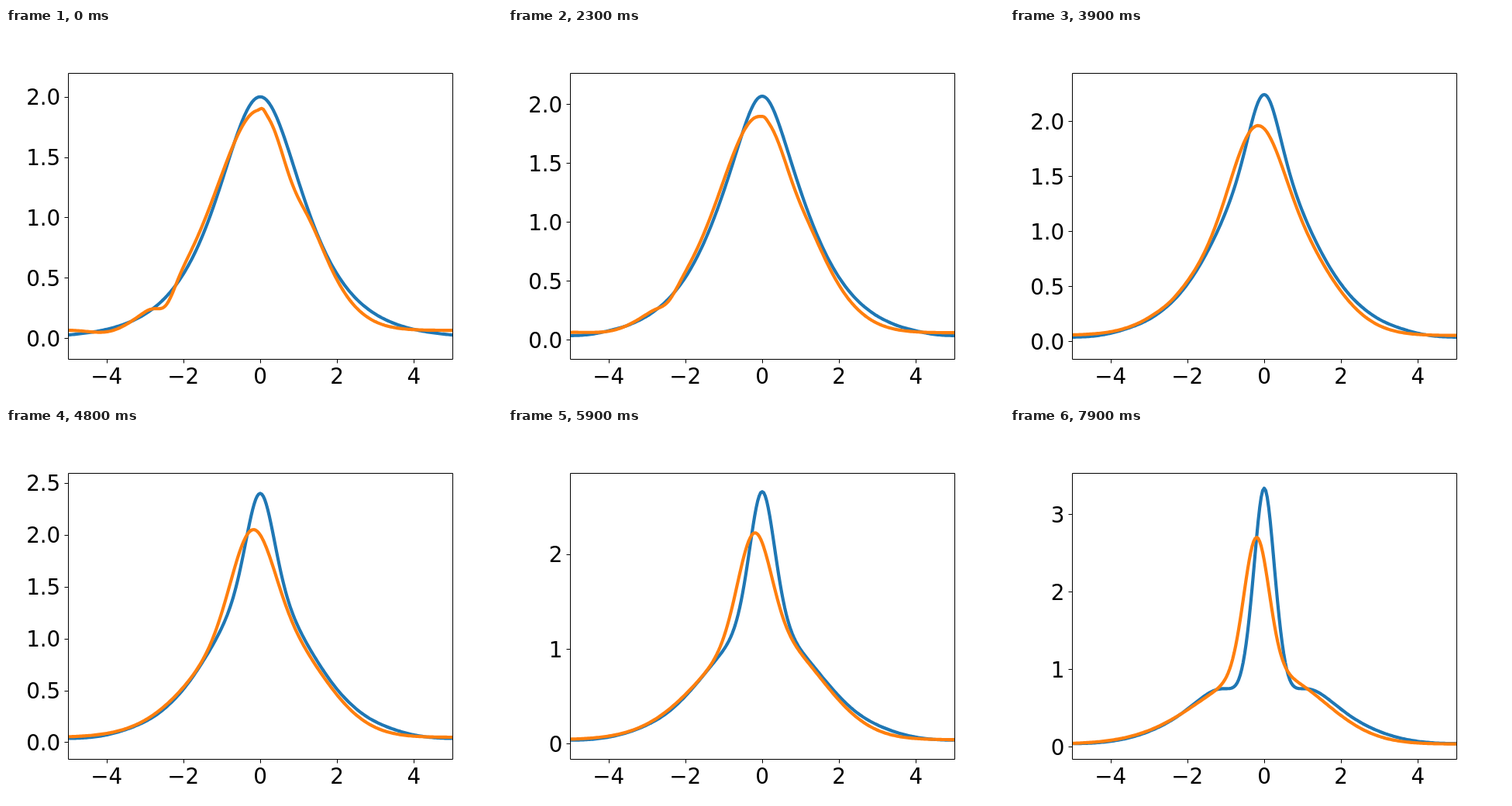
Animation, 640 px wide and 480 px high, one loop 8000 ms. Source, as an HTML page:

```html
<!DOCTYPE html>
<html lang="en">
<head>
<meta charset="utf-8">
<title>Second-order soliton: solution and approximation</title>
<style>
  html, body { margin: 0; width: 100%; height: 100%; overflow: hidden; background: #fff; }
  svg { display: block; width: 100vw; height: 100vh; }
  text { font: 27.78px "DejaVu Sans", sans-serif; fill: #000; }
  .curve { fill: none; stroke-width: 4.17; stroke-linejoin: round; stroke-linecap: square; }
  .axis { fill: none; stroke: #000; stroke-width: 1; }
</style>
</head>
<body>
<svg viewBox="0 0 640 480">
  <clipPath id="plot"><rect x="80" y="57.6" width="496" height="369.6"/></clipPath>
  <g clip-path="url(#plot)">
    <path id="exact" class="curve" stroke="#1f77b4"/>
    <path id="approx" class="curve" stroke="#ff7f0e"/>
  </g>
  <path class="axis" d="M80.5 58.5H576.5V427.5H80.5Z"/>
  <g id="xTicks"></g>
  <g id="yTicks"></g>
</svg>
<script>
const LOOP = 8000, FIRST_HOLD = 500, STEP = 100, LAST = 75;
const TOP = 57.6, BOTTOM = 427.2;
const HALF = 5, M = 128, SUBSTEPS = 8;
const $ = id => document.getElementById(id);
const crisp = v => Math.floor(v + 0.5) + 0.5;
const px = x => 80 + (x + HALF) * 49.6;
const bell = (x, mid, width) => Math.exp(-((x - mid) ** 2) / (2 * width ** 2));
const ease = u => { u = Math.min(u, 1); return u * u * (3 - 2 * u); };

// i u_t + u_xx / 2 + |u|^2 u = 0, periodic and even, u(x, 0) = 2 sech x.
// Split-step cosine method on [0, 5]; returns |u| for every step.
function solve() {
  const dt = Math.PI / 400 / SUBSTEPS;
  const cos = Array.from({ length: 2 * M }, (_, i) => Math.cos(Math.PI * i / M));
  const weight = j => (j === 0 || j === M ? 0.5 : 1);
  const transform = (u, scale) => {
    const out = new Float64Array(M + 1);
    const w = u.map((v, j) => v * weight(j) * scale);
    for (let n = 0; n <= M; n++) {
      let sum = 0;
      for (let j = 0; j <= M; j++) sum += w[j] * cos[(n * j) % (2 * M)];
      out[n] = sum;
    }
    return out;
  };
  let re = Float64Array.from({ length: M + 1 }, (_, j) => 2 / Math.cosh(HALF * j / M));
  let im = new Float64Array(M + 1);
  const rotate = angle => {
    for (let j = 0; j <= M; j++) {
      const a = angle(j), c = Math.cos(a), s = Math.sin(a), r = re[j];
      re[j] = r * c - im[j] * s;
      im[j] = r * s + im[j] * c;
    }
  };
  const nonlinear = j => (re[j] ** 2 + im[j] ** 2) * dt / 2;
  const linear = n => -0.5 * (n * Math.PI / HALF) ** 2 * dt;
  const size = () => Array.from(re, (r, j) => Math.hypot(r, im[j]));
  const steps = [size()];
  while (steps.length <= LAST) {
    for (let s = 0; s < SUBSTEPS; s++) {
      rotate(nonlinear);
      re = transform(re, 2 / M);
      im = transform(im, 2 / M);
      rotate(linear);
      re = transform(re, 1);
      im = transform(im, 1);
      rotate(nonlinear);
    }
    steps.push(size());
  }
  return steps;
}

// The approximation at progress q: a flat tail, a broad lopsided base,
// a peak that narrows and grows, and early ripples that fade out.
function approximation(q) {
  const late = q ** 7;
  const tail = 0.065 - 0.03 * q;
  const baseHeight = 1.13 - 0.21 * late;
  const base = x => baseHeight * Math.exp(x < 0
    ? -(0.214 - 0.03 * late) * x * x
    : -(0.25 - 0.05 * q) * x ** 2.2);

  const peakHeight = 0.7 + 1.05 * q ** 3.25;
  const peakWidth = 0.9 - 0.575 * ease(q);
  const peakMid = -0.2 * ease(2 * q);

  const fade = Math.max(0, 1 - 2 * q);
  const ripples = x => 0.025 * bell(x, 0.06, 0.06) - 0.2 * bell(x, 0.8, 0.33)
    - 0.12 * bell(x, -2.45, 0.22) - 0.05 * bell(x, -3.9, 0.5);

  return x => tail + base(x) + peakHeight * bell(x, peakMid, peakWidth) + fade * ripples(x);
}

const exactSteps = solve();
const grid = Array.from({ length: 2 * M + 1 }, (_, i) => HALF * (i - M) / M);
const label = (x, y, anchor, str) => `<text x="${x}" y="${y}" text-anchor="${anchor}">${str}</text>`;

$("xTicks").innerHTML = [-4, -2, 0, 2, 4].map(v =>
  `<path class="axis" d="M${crisp(px(v))} 427.5v5"/>`
  + label(px(v), 459, "middle", String(v).replace("-", "\u2212"))).join("");

function draw(step) {
  const sizes = exactSteps[step];
  const low = Math.min(...sizes) - 0.2, high = Math.max(...sizes) + 0.2;
  const py = v => BOTTOM - (v - low) / (high - low) * (BOTTOM - TOP);
  const trace = f => "M" + grid.map((x, i) =>
    px(x).toFixed(2) + " " + py(f(x, i)).toFixed(2)).join("L");
  $("exact").setAttribute("d", trace((x, i) => sizes[Math.abs(i - M)]));
  $("approx").setAttribute("d", trace(approximation(step / LAST)));

  const gap = high - low > 3 ? 1 : 0.5;
  let ticks = "";
  for (let v = 0; v <= high; v += gap) {
    const y = py(v);
    ticks += `<path class="axis" d="M80.5 ${crisp(y)}h-5"/>`
      + label(70.3, Math.round(y + 10.6), "end", v.toFixed(gap < 1 ? 1 : 0));
  }
  $("yTicks").innerHTML = ticks;
}

let shown = -1;
function tick() {
  const t = performance.now() % LOOP;
  const step = t < FIRST_HOLD ? 0 : Math.min(LAST, Math.floor((t - FIRST_HOLD) / STEP) + 1);
  if (step !== shown) draw(shown = step);
  requestAnimationFrame(tick);
}
tick();
</script>
</body>
</html>
```
